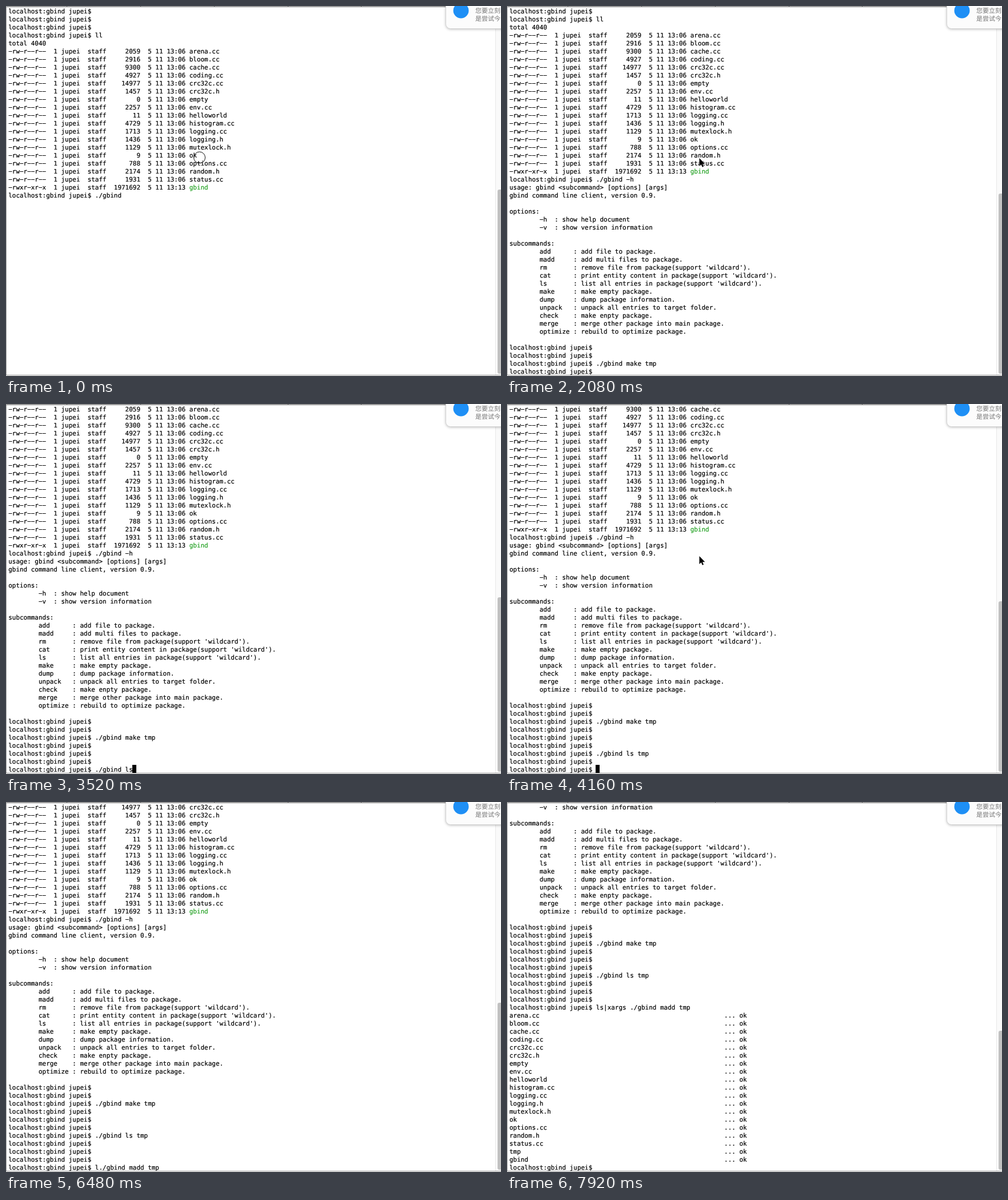
An HTML page that plays this animation: 866 px wide and 647 px high, repeating every 8000 ms.

```html
<!DOCTYPE html>
<html lang="en">
<head>
<meta charset="utf-8">
<title>Terminal session</title>
<style>
  html, body { margin: 0; width: 100%; height: 100%; overflow: hidden; background: #fff; }
  svg { display: block; }
  text { white-space: pre; text-rendering: geometricPrecision; }
  #rows { font: 10.96px "DejaVu Sans Mono", monospace; stroke: #000; stroke-width: .2px; }
  #rows tspan { fill: #22a022; stroke: #22a022; }
  #note { font: 11px "Noto Sans CJK SC", "Noto Sans CJK", sans-serif; fill: #777; }
  #panel { filter: drop-shadow(0 1px 2px rgba(0, 0, 0, .25)); }
  #caret { fill: #fff; mix-blend-mode: difference; }
</style>
</head>
<body>
<svg id="stage" width="866" height="647" viewBox="0 0 866 647">
  <rect width="866" height="647" fill="#fff"/>
  <g id="rows"></g>
  <rect id="caret" width="7" height="14"/>

  <rect x="857" y="2" width="9" height="643" fill="#fafafa"/>
  <rect x="856" y="2" width="1" height="643" fill="#e8e8e8"/>
  <rect id="thumb" x="860" width="12" rx="3" fill="#c1c1c1"/>

  <rect width="866" height="1" fill="#bbb"/>
  <path d="M106.5 0v1M235.5 0v1M364.5 0v1M493.5 0v1M621.5 0v1" stroke="#555"/>
  <rect y="1" width="866" height="1" fill="#777"/>
  <rect width="1" height="646" fill="#a0a0a0"/>
  <rect y="645" width="866" height="1" fill="#8a8a8a"/>

  <rect id="panel" x="769.5" y="-20" width="120" height="59.5" rx="8" fill="#fcfcfc" stroke="#d4d4d4"/>
  <circle cx="796" cy="8" r="13.5" fill="#1e8ff5"/>
  <g id="note">
    <text x="821" y="12">您要立刻</text>
    <text x="821" y="26">是尝试今</text>
  </g>

  <circle id="ring" cx="338.5" cy="265" r="10" fill="none" stroke="#111"/>
  <path id="arrow" d="M336.5 266v14l3.2-2.9 2.1 4.7 2.3-1-2.1-4.6h4.3z" fill="#000" stroke="#fff" stroke-width="1.2" paint-order="stroke"/>
</svg>
<script>
const LOOP = 8000, TICK = 80, ROWS = 46, LINE = 14, LEFT = 4.2, CHAR = 6.6;
const USER = 'jupei', TOOL = 'gbind';
const PROMPT = `localhost:${TOOL} ${USER}$ `;
const $ = id => document.getElementById(id);
const svg = (name, parent) =>
  parent.appendChild(document.createElementNS('http://www.w3.org/2000/svg', name));

const files = `arena.cc 2059,bloom.cc 2916,cache.cc 9300,coding.cc 4927,crc32c.cc 14977,
crc32c.h 1457,empty 0,env.cc 2257,helloworld 11,histogram.cc 4729,logging.cc 1713,
logging.h 1436,mutexlock.h 1129,ok 9,options.cc 788,random.h 2174,status.cc 1931`
  .split(',').map(f => f.trim().split(' '));

const entry = (mode, size, time, name) =>
  `${mode}  1 ${USER}  staff  ${size.padStart(7)}  5 11 ${time} ${name}`;

const intro = [
  PROMPT, PROMPT, PROMPT, PROMPT + 'll', 'total 4040',
  ...files.map(([name, size]) => entry('-rw-r--r--', size, '13:06', name)),
  entry('-rwxr-xr-x', '1971692', '13:13', TOOL)
];

const commands = {
  add: 'add file to package.',
  madd: 'add multi files to package.',
  rm: "remove file from package(support 'wildcard').",
  cat: "print entity content in package(support 'wildcard').",
  ls: "list all entries in package(support 'wildcard').",
  make: 'make empty package.',
  dump: 'dump package information.',
  unpack: 'unpack all entries to target folder.',
  check: 'make enpty package.',
  merge: 'merge other package into main package.',
  optimize: 'rebuild to optimize package.'
};

const indent = ' '.repeat(8);
const help = [
  `usage: ${TOOL} <subcommand> [options] [args]`,
  `${TOOL} command line client, version 0.9.`, '',
  'options:',
  indent + '-h  : show help document',
  indent + '-v  : show version information', '',
  'subcommands:',
  ...Object.entries(commands).map(([k, v]) => `${indent}${k.padEnd(9)}: ${v}`), ''
];

const added = [...files.map(f => f[0]), 'tmp', TOOL].map(f => f.padEnd(57) + '... ok');

// What each command prints
function output(cmd) {
  if (cmd.endsWith('-h')) return help;
  return cmd.includes('madd') ? added : [];
}

// Keystrokes: first tick, text, ticks per key
const HOME = '\x01';
const keys = [
  [1, ' -h', 2], [6, '\n\n\n', 2],
  [12, `./${TOOL} make tmp`, .65], [24, '\n\n', 4], [33, '\n\n', 1],
  [35, `./${TOOL} ls tmp`, 1], [49, '\n\n', 2], [54, '\n\n', 3],
  [59, `./${TOOL} `, 1], [67, 'madd tmp', 1.5],
  [79, HOME + 'l', 1], [82, 's|x', 1], [86, 'ar', 2], [89, 'gs ', 1], [93, '\n', 1]
].flatMap(([start, text, step]) => [...text].map((key, i) => [start + i * step, key]));

const caretOff = new Set([0, 2, 4, 7, 9, 23, 26, 30, 32, 50, 53, 55, 58,
  68, 71, 74, 77, 81, 85, 87, 92, 95, 97, 99]);

function session(tick) {
  const lines = [...intro];
  let cmd = `./${TOOL}`, pos = cmd.length;
  for (const [at, key] of keys) {
    if (at > tick) break;
    if (key === '\n') {
      lines.push(PROMPT + cmd, ...output(cmd));
      cmd = '';
      pos = 0;
    } else if (key === HOME) {
      pos = 0;
    } else {
      cmd = cmd.slice(0, pos) + key + cmd.slice(pos++);
    }
  }
  lines.push(PROMPT + cmd);
  return { lines, col: PROMPT.length + pos };
}

const rows = Array.from({ length: ROWS }, (_, i) => {
  const row = svg('text', $('rows'));
  row.setAttribute('x', LEFT);
  row.setAttribute('y', 13 + LINE * i);
  return row;
});

// Wide dashes, as in the terminal's typeface
const dashes = s => s.replace(/-/g, '\u2212');
const show = (id, on) => $(id).setAttribute('visibility', on ? 'visible' : 'hidden');

function draw(tick) {
  const { lines, col } = session(tick);
  const scroll = Math.max(0, lines.length - ROWS);
  rows.forEach((row, i) => {
    const line = dashes(lines[scroll + i] || '');
    const isTool = line.includes('rwx');
    row.textContent = isTool ? line.slice(0, 48) : line;
    if (isTool) svg('tspan', row).textContent = line.slice(48);
  });

  $('caret').setAttribute('x', Math.floor(LEFT + col * CHAR));
  $('caret').setAttribute('y', 1 + LINE * (lines.length - 1 - scroll));
  show('caret', !caretOff.has(tick));

  const size = Math.round(29070 / (90.4 + scroll));
  $('thumb').setAttribute('y', 643 - size);
  $('thumb').setAttribute('height', size);

  show('ring', tick < 1);
  show('arrow', (tick >= 22 && tick < 35) || (tick >= 49 && tick < 59));
}

const begin = performance.now();
let last = -1;
function loop() {
  const tick = Math.floor((performance.now() - begin) % LOOP / TICK);
  if (tick !== last) draw(last = tick);
  requestAnimationFrame(loop);
}
loop();
</script>
</body>
</html>
```
